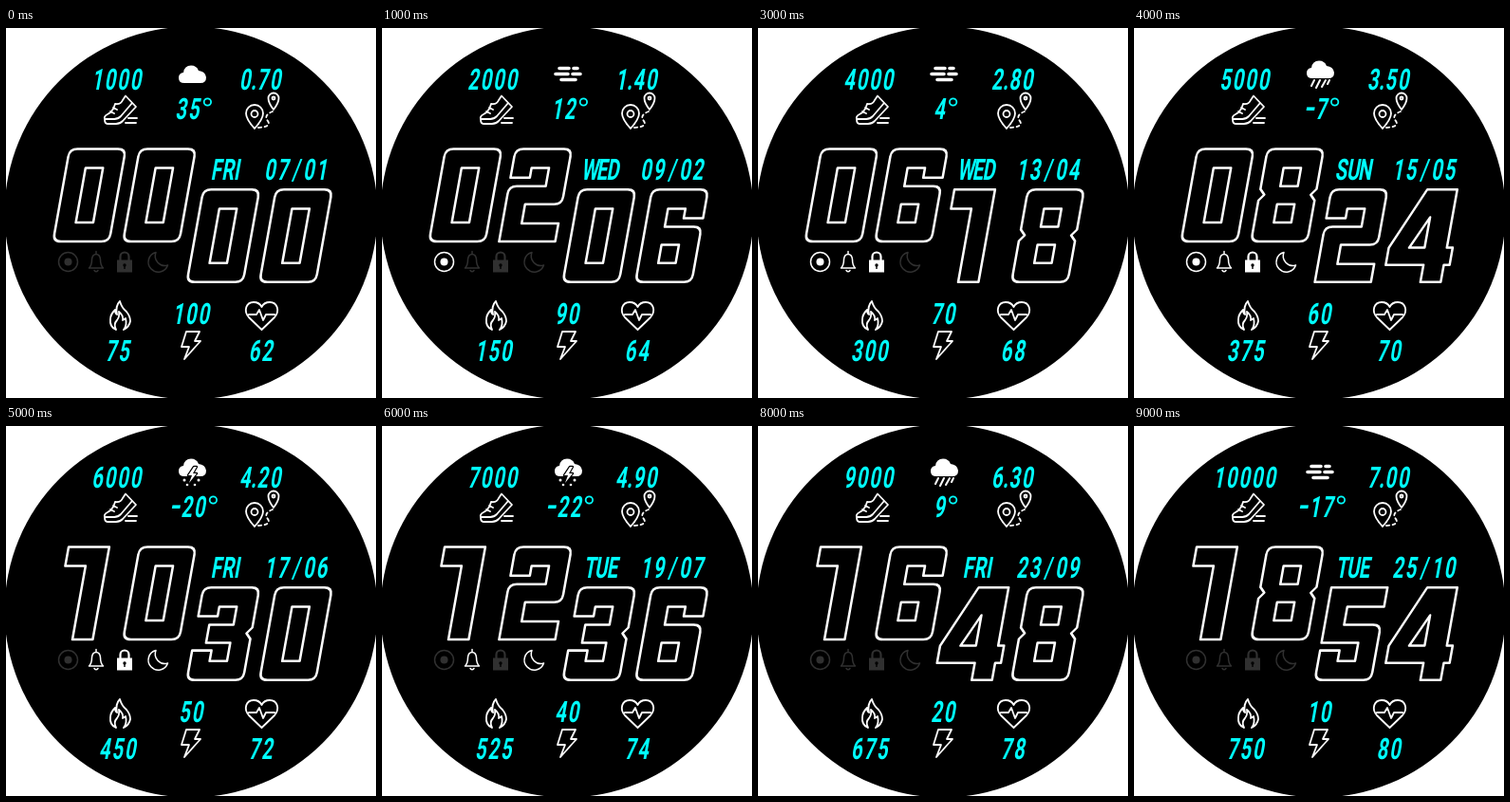
These frames come from a looping animation (390 px wide and 390 px high, 10000 ms). An HTML page with a canvas:

```html
<!DOCTYPE html>
<html lang="en">
<head>
<meta charset="utf-8">
<title>Watch face</title>
<style>
html, body { margin: 0; width: 100%; height: 100%; overflow: hidden; background: #fff; }
canvas { display: block; width: 390px; height: 390px; }
</style>
</head>
<body>
<canvas id="face" width="390" height="390"></canvas>
<script>
const ctx = document.getElementById('face').getContext('2d');
const WHITE = '#fff', CYAN = '#0ff', DIM = '#303030', BLACK = '#000';
const SLANT = 0.18, DIGIT_H = 97;

// Upright block digits, 58 x 97; the slant is added when drawing.
const FRAME = 'M8 0H50Q58 0 58 8V89Q58 97 50 97H8Q0 97 0 89V8Q0 0 8 0Z';
const HOLE = 'M20 58H38V77H20Z';
const DIGITS = {
  0: FRAME + 'M20 20H38V77H20Z',
  1: 'M-1 0H41V97H20V20H-1Z',
  2: 'M0 30V8Q0 0 8 0H50Q58 0 58 8V50Q58 58 50 58H20V78H58V97H0V47Q0 39 8 39H38V20H20V30Z',
  3: 'M0 30V8Q0 0 8 0H50Q58 0 58 8V42L53 48L58 54V89Q58 97 50 97H8Q0 97 0 89V66H20V77H38V58H13V39H38V20H20V30Z',
  4: 'M24 0H55V61H61V79H55V97H34V79H-5V61ZM32 29V61H16Z',
  5: 'M0 0H58V20H20V39H50Q58 39 58 47V89Q58 97 50 97H8Q0 97 0 89V66H20V77H38V58H0Z',
  6: 'M58 30V8Q58 0 50 0H8Q0 0 0 8V89Q0 97 8 97H50Q58 97 58 89V47Q58 39 50 39H20V20H38V30Z' + HOLE,
  8: 'M8 0H50Q58 0 58 8V42L53 48L58 54V89Q58 97 50 97H8Q0 97 0 89V54L5 48L0 42V8Q0 0 8 0ZM20 20H38V39H20Z' + HOLE
};

const ICONS = {
  shoe: 'M104 96Q103 93 107 91Q113 88 115 80Q121 81 123 76L126 71.5L137 83L123 98Q120 101 116 101H107Q104 101 104 96ZM104 96H114Q118 96 121 93L133 79M113 84L117 86M110 88L114 90M129 95H138M126 100H137',
  pins: 'M262 106Q253 96 253 90A9 9 0 0 1 271 90Q271 96 262 106ZM258.5 90.5a3.5 3.5 0 1 0 7 0a3.5 3.5 0 1 0 -7 0M282 86Q276.5 79 276.5 74A5.5 5.5 0 0 1 287.5 74Q287.5 79 282 86ZM280.5 74a1.5 1.5 0 1 0 3 0a1.5 1.5 0 1 0 -3 0',
  trail: 'M266 105Q280 104 276 98Q271 92 281 88',
  flame: 'M116 318Q109 315 110 307Q110 302 115 297Q115 301 117 302Q115 293 120 288Q122 295 127 299Q131 304 131 309Q130 315 124 318M116 318Q113 312 117 308Q120 304 119 299Q124 303 123 308L126 306Q128 313 124 318',
  bolt: 'M190 320H204L199 330H205L188 349L193 336H185Z',
  heart: 'M269.5 318L256 305C250 298 253 289 261 289Q267 289 269.5 294Q272 289 278 289C286 289 289 298 283 305ZM256 302H264L267 297L271 308L274 302H283',
  bell: 'M87.5 253H102.5Q99.5 250 99.5 244Q99 238.5 95 238.5Q91 238.5 90.5 244Q90.5 250 87.5 253ZM93 255.5Q95 258 97 255.5M95 235.5V238.5',
  shackle: 'M120.5 246V241a4.5 4.5 0 0 1 9 0V246',
  moon: 'M158 236.5A10.5 10.5 0 1 0 170.5 250A10.2 10.2 0 0 1 158 236.5Z',
  cloud: 'M188 58Q182 58 182 52.5Q182 47.5 187 47Q188 39.5 195 39.5Q201 39.5 203 45Q210 45.5 211 52Q211 58 205 58Z',
  rain: 'M190 55L187 61M196 55L192 63M202 55L198 62M206 55L204 59',
  fog: 'M187 42.5H197M202 42.5H206M183 48.5H196M201 48.5H209M189 54.5H204',
  spark: 'M198 43L192 52H196L193 60L201 50H197L201 43Z'
};

const SKIES = ['cloud', 'fog', 'storm', 'fog', 'rain', 'storm', 'storm', 'fog', 'rain', 'fog'];
const TEMPS = [35, 12, -11, 4, -7, -20, -22, -17, 9, -17];
const DAYS = ['FRI', 'WED', 'FRI', 'WED', 'SUN', 'FRI', 'TUE', 'SUN', 'FRI', 'TUE'];
const ADVANCE = { '.': 5, '/': 14, '−': 12, '°': 9.5, I: 6, T: 11, E: 11, W: 14 };

const pad = n => String(n).padStart(2, '0');
const between = (n, first, last) => n >= first && n <= last;

function line(path, color = WHITE, width = 1.8) {
  ctx.strokeStyle = color;
  ctx.lineWidth = width;
  ctx.stroke(new Path2D(path));
}

function fill(path, color = WHITE) {
  ctx.fillStyle = color;
  ctx.fill(new Path2D(path));
}

function disc(x, y, r, color) {
  ctx.fillStyle = color;
  ctx.beginPath();
  ctx.arc(x, y, r, 0, Math.PI * 2);
  ctx.fill();
}

function ring(x, y, r, color, width) {
  ctx.strokeStyle = color;
  ctx.lineWidth = width;
  ctx.beginPath();
  ctx.arc(x, y, r, 0, Math.PI * 2);
  ctx.stroke();
}

const advance = ch => ADVANCE[ch] || (/\d/.test(ch) ? 13.5 : 12.5);

// Narrow slanted label, centred on cx.
function label(value, cx, base) {
  const chars = [...String(value)];
  const total = chars.reduce((sum, ch) => sum + advance(ch), 0);
  let x = cx - (total - 2) / 2 - 2;
  ctx.font = '600 31px Roboto, sans-serif';
  ctx.textAlign = 'center';
  for (const ch of chars) {
    const mid = x + (advance(ch) - 2) / 2;
    if (ch === '°') {
      ring(mid + 3.4, base - 18, 3.7, CYAN, 1.8);
    } else {
      ctx.save();
      ctx.transform(0.65, 0, -SLANT, 1, mid, base);
      ctx.fillStyle = CYAN;
      ctx.fillText(ch, 0, 0);
      ctx.restore();
    }
    x += advance(ch);
  }
}

function digit(d, x, y) {
  ctx.save();
  ctx.transform(1.02, 0, -SLANT, 1.005, x + SLANT * DIGIT_H, y);
  line(DIGITS[d], WHITE, 2.5);
  ctx.restore();
}

function sky(kind) {
  if (kind === 'fog') return line(ICONS.fog, WHITE, 3.6);
  ctx.save();
  if (kind !== 'cloud') ctx.translate(0, -5);
  fill(ICONS.cloud);
  ctx.restore();
  if (kind === 'rain') line(ICONS.rain, WHITE, 2);
  if (kind === 'storm') {
    line(ICONS.spark, BLACK, 2.4);
    fill(ICONS.spark);
    disc(188, 57, 1.5, WHITE);
    disc(203, 57, 1.5, WHITE);
    disc(191, 62, 1.3, WHITE);
    disc(199, 62, 1.3, WHITE);
  }
}

function status(n) {
  const tone = on => on ? WHITE : DIM;
  const link = tone(between(n, 1, 4));
  const lock = tone(between(n, 2, 5));
  ring(65.5, 246.5, 10, link, 1.5);
  disc(65.5, 246.5, 4, link);
  line(ICONS.bell, tone(between(n, 3, 6)), 1.5);
  line(ICONS.shackle, lock, 2.2);
  ctx.fillStyle = lock;
  ctx.fillRect(117, 244.5, 16, 13);
  disc(125, 250, 1.7, BLACK);
  ctx.fillRect(124.3, 250, 1.4, 4);
  line(ICONS.moon, tone(between(n, 4, 7)), 1.5);
}

function draw(n) {
  ctx.fillStyle = WHITE;
  ctx.fillRect(0, 0, 390, 390);
  disc(195, 195, 196.5, BLACK);
  ctx.lineCap = ctx.lineJoin = 'round';

  label(1000 * (n + 1), 118, 64.5);
  label((0.7 * (n + 1)).toFixed(2), 269.5, 64.5);
  const t = TEMPS[n];
  label((t < 0 ? '−' : '') + Math.abs(t) + '°', 197.5, 96);
  label(DAYS[n], 232.3, 159.5);
  label(pad(7 + 2 * n) + '/' + pad(n + 1), 307, 159.5);
  label(100 - 10 * n, 196.5, 312);
  label(75 * (n + 1), 119, 351);
  label(62 + 2 * n, 270, 351);

  sky(SKIES[n]);
  for (const name of ['shoe', 'pins', 'flame', 'bolt', 'heart']) line(ICONS[name]);
  ctx.setLineDash([3, 3.5]);
  line(ICONS.trail);
  ctx.setLineDash([]);
  status(n);

  const [h1, h2] = pad(2 * n), [m1, m2] = pad(6 * n);
  digit(h1, 49.6, 127.5);
  digit(h2, 123.4, 127.5);
  digit(m1, 190.6, 170.3);
  digit(m2, 267.2, 170.3);
}

function tick() {
  draw(Math.floor(performance.now() / 1000) % 10);
  requestAnimationFrame(tick);
}
tick();
</script>
</body>
</html>
```
